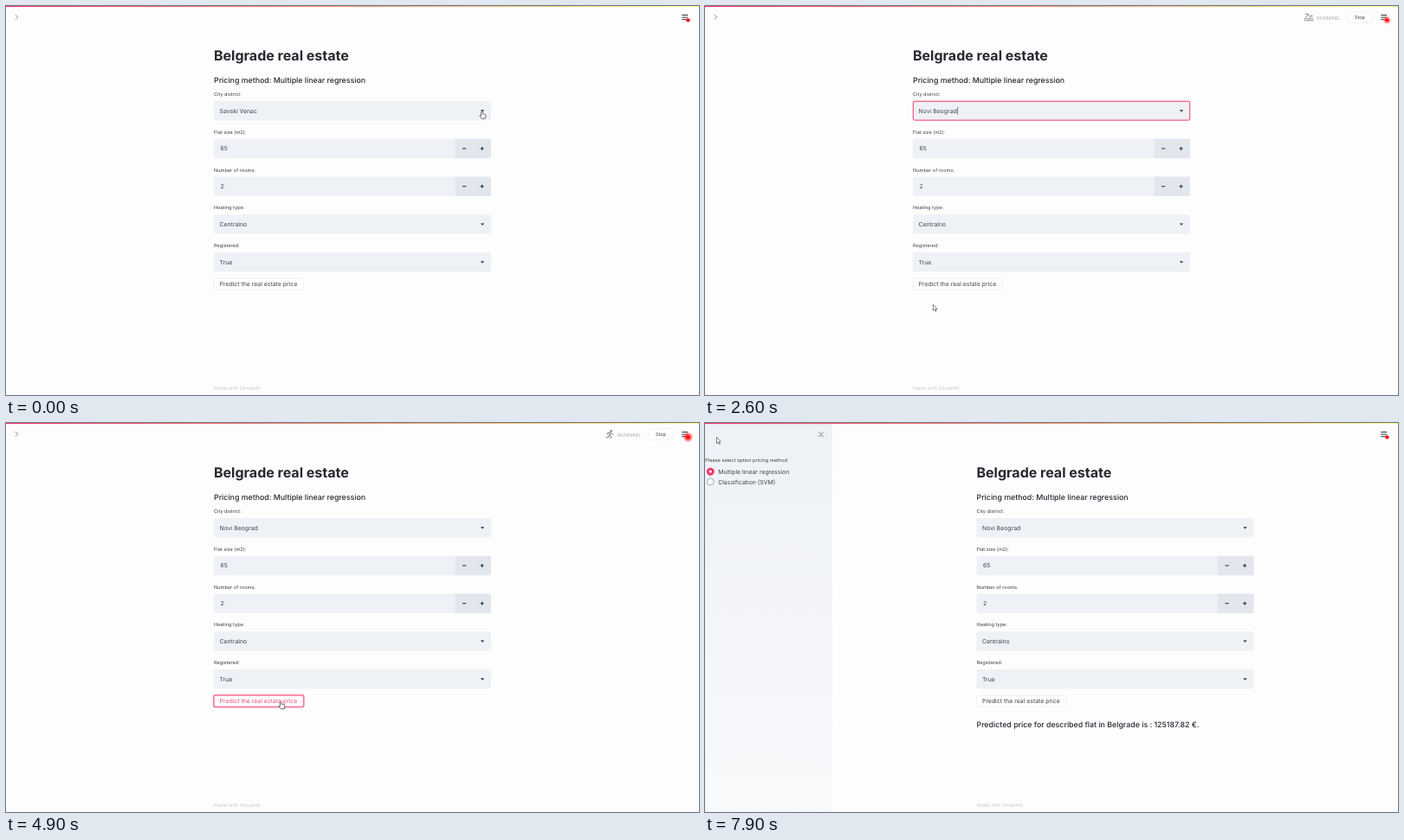
An HTML page that plays this animation: 800x450 px, repeating every 8 s.

```html
<!DOCTYPE html>
<html lang="en">
<head>
<meta charset="utf-8">
<title>Real estate form</title>
<style>
  html, body { margin: 0; width: 100%; height: 100%; overflow: hidden; background: #fefdfe; }
  svg { display: block; width: 800px; height: 450px; }
  text {
    font-family: Inter, Roboto, sans-serif;
    font-size: 6.9px;
    font-optical-sizing: none;
    text-rendering: geometricPrecision;
    fill: #41434c;
    white-space: pre;
  }
  .title { font-size: 16px; font-weight: 700; fill: #262730; }
  .sub { font-size: 8.8px; font-weight: 500; fill: #262730; }
  .label { font-size: 5.6px; fill: #3c3e48; }
  .foot { font-size: 5.7px; fill: #c9cad0; }
  .status { font-size: 5.6px; fill: #a9abb2; }
  .stop { font-size: 5.5px; }
  .item { fill: #989aa1; }
  .item.on { fill: #262730; font-weight: 600; }
  .field { fill: #eef1f5; }
  .steps { fill: #e2e7ed; }
  .line { fill: none; stroke-linecap: round; stroke-linejoin: round; }
</style>
</head>
<body>
<svg viewBox="0 0 800 450" id="stage"></svg>
<script>
const LOOP = 8000, TICK = 100;
const SIDEBAR = 154, ROW = 43.75, ITEM = 19.03;
const PINK = '#f63366';
const districts = ['Barajevo', 'Cukarica', 'Grocka', 'Lazarevac', 'Mladenovac', 'Novi Beograd',
  'Obrenovac', 'Palilula', 'Rakovica', 'Savski Venac', 'Stari grad', 'Surcin',
  'Vozdovac', 'Vracar', 'Zemun', 'Zvezdara'];

// Moments of the session, in ms
const OPEN = 200, PICK = 1500, PRESS = 4300, RESULT = 5800, SLIDE = 7680;

// time, x, y of the hot spot, pointer shape held until the next entry
const path = [
  [0, 549.5, 121.5, 'hand'], [200, 549.5, 121.5, 'hand'], [300, 545, 117, 'arrow'],
  [500, 535.5, 109, 'arrow'], [700, 505, 130, 'arrow'], [1000, 400, 198, 'hand'],
  [1300, 300, 240, 'hand'], [1500, 284, 244, 'beam'], [1800, 284, 244, 'beam'],
  [2000, 225, 292, 'arrow'], [2200, 171, 340, 'arrow'], [2400, 190, 364, 'arrow'],
  [2700, 300, 336, 'arrow'], [2900, 317.5, 323.5, 'hand'], [3900, 317.5, 323.5, 'hand'],
  [4300, 317.5, 322, 'hand'], [5700, 317.5, 322, 'hand'], [6200, 311.5, 315, 'hand'],
  [6300, 193, 240, 'arrow'], [6600, 110, 110, 'arrow'], [7000, 44, 28, 'arrow'],
  [7200, 36, 11, 'arrow'], [7400, 12, 12, 'hand'], [7700, 12.5, 13, 'arrow'],
  [7900, 13.5, 16.5, 'arrow']
];

const text = (x, y, s, cls = '', id = '') => `<text x="${x}" y="${y}" class="${cls}" id="${id}">${s}</text>`;
const rect = (x, y, w, h, attrs = '') => `<rect x="${x}" y="${y}" width="${w}" height="${h}" ${attrs}/>`;
const line = (d, color, width, attrs = '') =>
  `<path class="line" d="${d}" stroke="${color}" stroke-width="${width}" ${attrs}/>`;

function row(i, label, value, isNumber) {
  const y = 109.9 + i * ROW, mid = y + 11.3;
  let out = text(240, y - 5.8, label, 'label') + rect(240, y, 320, 22.5, 'rx="1.8" class="field"');
  if (isNumber) {
    out += `<path class="steps" d="M518.6 ${y}h39.6a1.8 1.8 0 0 1 1.8 1.8v18.9a1.8 1.8 0 0 1 -1.8 1.8h-39.6z"/>`
      + line(`M527.4 ${mid}h3.4M547.9 ${mid}h3.4M549.6 ${mid - 1.7}v3.4`, '#262730', 1);
  } else {
    out += `<path d="M547.8 ${mid - 1}h4.4l-2.2 2.2z" fill="#262730"/>`;
  }
  return out + text(isNumber ? 247.5 : 246.5, mid + 2.5, value, '', 'value' + i);
}

function menu() {
  const items = districts.map((name, i) =>
    text(247, 151 + i * ITEM, name, name === 'Savski Venac' ? 'item on' : 'item'));
  return `<g id="menu">${rect(240, 135.8, 320, 311, 'rx="1.8" fill="#fefefe" filter="url(#shadow)"')}
    ${rect(240, 0, 320, ITEM, 'id="hover" class="field"')}${items.join('')}</g>`;
}

function radio(y, label, on) {
  return `<circle cx="13.3" cy="${y}" r="${on ? 4.2 : 3.9}" fill="${on ? PINK : '#fdfdfe'}"
    stroke="${on ? PINK : '#6d7079'}" stroke-width=".6"/>`
    + (on ? `<circle cx="13.3" cy="${y}" r="1.6" fill="#fff"/>` : '')
    + text(22.2, y + 2.5, label);
}

const sports = [
  // runner
  '<circle cx="698.6" cy="9.3" r="1.2" fill="#85878e"/>'
    + line('M697.9 11.4L696.4 14L698.4 15.4L697.8 18M696.4 14L695.6 16.2L693 16.6M697.7 11.3L695 11.4L693.8 13.2M698 11.5L699.3 13L700.9 12.8', '#85878e', 1.1),
  // swimmer
  '<circle cx="700.4" cy="11.6" r="1.1" fill="#85878e"/>'
    + line('M693 9.2L696.3 9.4L698.6 13M696.3 10L693.6 13M692 14.6q1.3 -1 2.5 0t2.5 0t2.5 0t2.5 0M692 16.7q1.3 -1 2.5 0t2.5 0t2.5 0t2.5 0', '#85878e', 1),
  // cyclist
  '<circle cx="698.4" cy="8.9" r="1.1" fill="#85878e"/>'
    + '<circle cx="693.8" cy="15" r="2.6" class="line" stroke="#85878e" stroke-width=".8"/>'
    + '<circle cx="700.2" cy="15" r="2.6" class="line" stroke="#85878e" stroke-width=".8"/>'
    + line('M696.9 16.4L697 14L695 12.5L697.4 10.5L698.6 12.2L700.4 12.3', '#85878e', 1)
];

const pointers = {
  arrow: '<path d="M0 0V7L1.6 5.6L2.7 8L3.8 7.5L2.7 5.2H4.8Z" fill="#fff" stroke="#333" stroke-width=".6"/>',
  hand: '<path d="M-.9 .7Q0 -.7 .8 .7V3.2L3.9 3.9Q4.7 4.2 4.5 5.2L3.7 8.7H-.4L-2.7 5.6Q-2.7 4.5 -.9 5.4Z" fill="#fff" stroke="#333" stroke-width=".7" stroke-linejoin="round"/>',
  beam: line('M-1.4 -3.2Q0 -3.2 0 -2.6Q0 -3.2 1.4 -3.2M0 -2.6V2.6M-1.4 3.2Q0 3.2 0 2.6Q0 3.2 1.4 3.2', '#444', .7)
};

document.getElementById('stage').innerHTML = `
  <defs>
    <linearGradient id="bar"><stop stop-color="${PINK}"/><stop offset="1" stop-color="#fffd80"/></linearGradient>
    <linearGradient id="panel" x2="0" y2="1"><stop stop-color="#eef1f5"/><stop offset="1" stop-color="#f8f9fb"/></linearGradient>
    <filter id="shadow" x="-5%" y="-5%" width="110%" height="110%">
      <feDropShadow dx="0" dy="1.5" stdDeviation="2.6" flood-color="#000" flood-opacity=".26"/></filter>
    <filter id="soft" x="-100%" y="-100%" width="300%" height="300%"><feGaussianBlur stdDeviation="1"/></filter>
  </defs>
  ${rect(0, 0, 800, 450, 'fill="#fefdfe"')}
  <g id="main">
    ${text(240, 63, 'Belgrade real estate', 'title')}
    ${text(240, 88.8, 'Pricing method: Multiple linear regression', 'sub')}
    <g id="form">
      ${row(0, 'City district:', 'Savski Venac')}
      ${row(1, 'Flat size (m2):', '65', true)}
      ${row(2, 'Number of rooms:', '2', true)}
      ${row(3, 'Heating type:', 'Centralno')}
      ${row(4, 'Registered:', 'True')}
      ${rect(240.3, 110.2, 319.4, 21.9, `id="focus" rx="1.8" fill="none" stroke="${PINK}" stroke-width="1"`)}
      ${line('M0 117.2v8.2', '#262730', .6, 'id="caret"')}
      ${rect(239.8, 314.8, 103.9, 13.7, `id="ring" rx="2" fill="none" stroke="${PINK}" stroke-opacity=".5" stroke-width="2"`)}
      ${rect(240.2, 315.2, 103.1, 12.9, 'id="button" rx="1.8" fill="#fefefe" stroke-width=".6"')}
      ${text(246.5, 324.2, 'Predict the real estate price', '', 'press')}
    </g>
    ${text(240, 351.6, 'Predicted price for described flat in Belgrade is : 125187.82 €.', 'sub', 'result')}
    ${text(240, 443.6, 'Made with Streamlit', 'foot')}
    ${menu()}
  </g>
  ${line('M10.9 10.4L13.9 12.9L10.9 15.4', '#92949c', 1, 'id="chevron"')}
  <g id="side">
    ${rect(0, 0, SIDEBAR, 450, 'fill="url(#panel)"')}
    ${line('M138.6 10.8l4.8 4.8m0 -4.8l-4.8 4.8', '#a2a4ab', 1.1)}
    ${text(7.3, 45, 'Please select option pricing method', 'label')}
    ${radio(56.2, 'Multiple linear regression', true)}
    ${radio(68, 'Classification (SVM)', false)}
  </g>
  <g id="running">
    ${sports.map(s => `<g class="sport">${s}</g>`).join('')}
    ${text(706, 15.7, 'RUNNING...', 'status')}
    ${rect(742, 6.7, 28.3, 12.8, 'rx="1.8" fill="#fefefe" stroke="#e8e9ee" stroke-width=".6"')}
    ${text(750, 14.8, 'Stop', 'stop')}
  </g>
  ${line('M780.6 10.5h6.2M780.6 13.1h6.2M780.6 15.7h6.2', '#33353e', 1)}
  <circle id="glow" cx="787.4" cy="16.4" fill="#ff2020" filter="url(#soft)"/>
  <circle cx="787.4" cy="16.4" r="2.2" fill="#f51218"/>
  ${rect(0, 0, 800, 1.1, 'fill="url(#bar)"')}
  <g id="pointer"></g>`;

const $ = id => document.getElementById(id);
const set = (id, attrs) => { for (const k in attrs) $(id).setAttribute(k, attrs[k]); };
const show = (id, on) => set(id, { visibility: on ? 'visible' : 'hidden' });
const clamp = v => Math.max(0, Math.min(1, v));
const within = (t, a, b) => t >= a && t < b;

// The CSS "ease" curve, cubic-bezier(.25, .1, .25, 1)
function ease(p) {
  if (p <= 0 || p >= 1) return clamp(p);
  const bez = (a, b, u) => 3 * a * u * (1 - u) ** 2 + 3 * b * u * u * (1 - u) + u ** 3;
  let lo = 0, hi = 1;
  for (let i = 0; i < 20; i++) {
    const u = (lo + hi) / 2;
    if (bez(.25, .25, u) < p) lo = u; else hi = u;
  }
  return bez(.1, 1, lo);
}

function pointerAt(t) {
  let i = path.length - 1;
  while (path[i][0] > t) i--;
  const a = path[i], b = path[i + 1] || a;
  const p = b === a ? 0 : (t - a[0]) / (b[0] - a[0]);
  return { x: a[1] + (b[1] - a[1]) * p, y: a[2] + (b[2] - a[2]) * p, shape: a[3] };
}

function formOpacity(t) {
  const fade = start => 1 - .63 * clamp((t - start) / 900) ** 2;
  if (within(t, 2400, 3700)) return fade(2400);
  if (within(t, 4950, RESULT)) return fade(4950);
  return 1;
}

function statusOpacity(t) {
  const span = (a, b) => clamp((t - a + 100) / 200) * clamp((b - t) / 200);
  return Math.max(span(2200, 3900), span(4600, 6300));
}

function draw(t) {
  const cur = pointerAt(t);
  const shift = SIDEBAR * ease((t - SLIDE) / 300);
  set('main', { transform: `translate(${shift / 2} 0)` });
  set('side', { transform: `translate(${shift - SIDEBAR} 0)` });
  show('side', shift > 0);
  show('chevron', shift === 0);

  const picked = t >= PICK;
  $('value0').textContent = picked ? 'Novi Beograd' : 'Savski Venac';
  show('focus', within(t, OPEN, PRESS));
  show('caret', within(t, OPEN, PRESS) && (t - (picked ? PICK : OPEN)) % 1000 < 500);
  set('caret', { transform: `translate(${picked ? 291.6 : 290.4} 0)` });

  show('menu', within(t, OPEN, PICK));
  const over = Math.floor((cur.y - 139) / ITEM);
  const marked = t > 600 && over >= 0 ? over : 9;
  set('hover', { y: 139 + marked * ITEM });

  set('form', { opacity: formOpacity(t) });
  const pressed = within(t, PRESS, 7600);
  const hot = pressed || within(t, 2900, PRESS);
  show('ring', pressed);
  set('button', { stroke: hot ? PINK : '#e6e8ed' });
  $('press').style.fill = hot ? '#ee5078' : '';
  show('result', t >= RESULT);

  set('running', { opacity: statusOpacity(t) });
  const sport = Math.floor(t / 200) % 3;
  document.querySelectorAll('.sport').forEach((g, i) => g.setAttribute('opacity', i === sport ? 1 : 0));

  const pulse = (1 - Math.cos(t * Math.PI / 1000)) / 2;
  set('glow', { r: 2 + 2.4 * pulse, opacity: .85 * pulse });

  set('pointer', { transform: `translate(${cur.x} ${cur.y})` });
  $('pointer').innerHTML = pointers[cur.shape];
}

const start = performance.now();
function frame() {
  const t = (performance.now() - start) % LOOP;
  draw(Math.floor(t / TICK) * TICK);
  requestAnimationFrame(frame);
}
frame();
</script>
</body>
</html>
```
